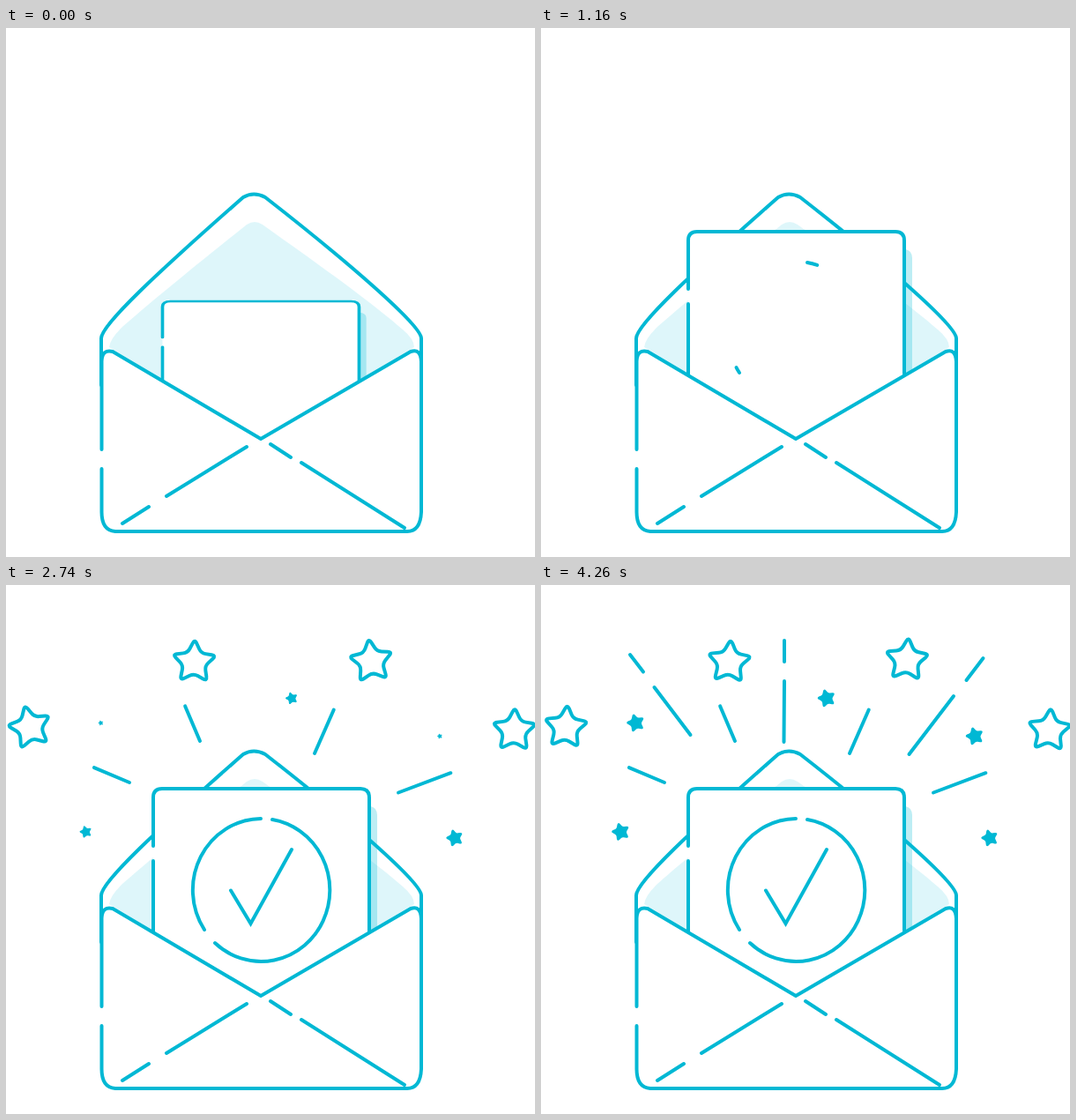
Animation of 600x600 px, one loop 4820 ms. Source, as an HTML page:

```html
<!DOCTYPE html>
<html lang="en">
<head>
<meta charset="utf-8">
<title>Opening envelope</title>
<style>
  html, body { margin: 0; width: 100%; height: 100%; overflow: hidden; background: #fff; }
  svg { display: block; width: 100%; height: 100%; }
  .line { fill: none; stroke: #00b8d4; stroke-width: 4; stroke-linecap: round; stroke-linejoin: round; }
  .white { fill: #fff; }
  .tint { fill: #00b8d4; }
</style>
</head>
<body>
<svg viewBox="0 0 600 600">
  <path class="tint" opacity=".13" d="M117 362Q118 353 130 341C145 327 200 281 273 223Q282 217 291 223C340 258 410 307 450 342Q463 353 463 362L289 466Z"/>
  <path class="line" stroke-width="4.5" d="M108 405V352C108 337 170 279 269 192Q281 185 294 192C385 263 471 337 471 352V378"/>
  <g id="card">
    <path class="tint" opacity=".26" d="M412 251Q421 252 421 261V440H412Z"/>
    <path class="white" d="M167 480V241Q167 231 177 231H402Q412 231 412 241V480Z"/>
    <path class="line" d="M167 296V241Q167 231 177 231H402Q412 231 412 241V392M167 313V420"/>
  </g>
  <g id="seal"></g>
  <path class="white" d="M108.5 378Q109 366 119 366L289 466L461 366Q471 366 471 378V549Q471 571 455 571H124Q108.5 571 108.5 549Z"/>
  <path class="line" d="M108.5 478V378Q109 364 121 367L289 466L459 367Q470 363 471 378V549Q470 571 455 571H124Q108.5 570 108.5 549V500M273 475L182 531M162 543L132 562M300 472L323 487M335 493L452 567"/>
  <g id="sky"></g>
</svg>
<script>
const LOOP = 4820, STEP = 20, START = 1680, END = 4260, SWAY = 1720;
const card = document.getElementById('card');
const seal = document.getElementById('seal');
const sky = document.getElementById('sky');

const clamp = (v, lo, hi) => Math.min(hi, Math.max(lo, v));
const progress = (t, from, to) => clamp((t - from) / (to - from), 0, 1);
const mix = (a, b, p) => a + (b - a) * p;

function addPath(parent, d, cls = 'line') {
  const path = document.createElementNS('http://www.w3.org/2000/svg', 'path');
  path.setAttribute('d', d);
  path.setAttribute('class', cls);
  parent.append(path);
  return path;
}

function stroke(parent, d) {
  const path = addPath(parent, d);
  path.setAttribute('pathLength', 100);
  return path;
}

// Reveal a fraction of a path from its beginning
function draw(path, p) {
  path.style.display = p > 0 ? '' : 'none';
  path.setAttribute('stroke-dasharray', p >= 1 ? 'none' : `${p * 100} 200`);
}

// Five-pointed star with rounded corners
function starPath() {
  const pts = Array.from({ length: 10 }, (_, i) => {
    const r = i % 2 ? 13 : 26, a = i * Math.PI / 5;
    return [r * Math.sin(a), -r * Math.cos(a)];
  });
  const along = (a, b) => a.map((v, i) => mix(v, b[i], 0.3).toFixed(2));
  return pts.map((p, i) => {
    const before = along(p, pts[(i + 9) % 10]), after = along(p, pts[(i + 1) % 10]);
    return `${i ? 'L' : 'M'}${before}Q${p} ${after}`;
  }).join('') + 'Z';
}

const arcs = ['M302 266A78 81 0 1 1 237 406', 'M225 391A78 81 0 0 1 289 265'].map(d => stroke(seal, d));
const check = stroke(seal, 'M255 346.5L277.5 384L324 300');
check.style.strokeLinejoin = 'miter';

const shortRays = ['M220 177L203 137', 'M140 224L99.5 207', 'M350 191L372 141', 'M445 235.5L505 213']
  .map(d => stroke(sky, d));
const longRays = [
  'M169.5 170L128.5 116', 'M116 98.5L101 79',
  'M275.5 178L276 109', 'M276 87L276 63',
  'M417.5 192L468 126', 'M482.5 108L501.5 83'
].map(d => stroke(sky, d));

const shape = starPath();
// x, y, sine part of the sway, vertical drift per degree
const bigStars = [[212.5, 87.5, 3, 0], [414, 87.5, -9, 0.14], [575.5, 165, 3, 0], [27.2, 161.5, -19, 0]]
  .map(s => [addPath(sky, shape), ...s]);
// x, y, pulse period, delay
const smallStars = [[107.5, 156.5, 430, 0], [324, 128.5, 860, 0], [492, 171.5, 430, 0], [90.5, 280, 860, 0], [509, 287, 1290, -115]]
  .map(s => [addPath(sky, shape, 'line'), ...s]);
smallStars.forEach(([path]) => { path.style.fill = '#00b8d4'; });

function place(path, x, y, angle, scale) {
  path.style.display = scale > 0 ? '' : 'none';
  path.setAttribute('transform', `translate(${x} ${y}) rotate(${angle}) scale(${scale})`);
}

function render(t) {
  const grow = progress(t, 0, 660);
  const top = t < 640 ? mix(310, 208.5, t / 640) : mix(208.5, 231, progress(t, 640, 780));
  card.setAttribute('transform',
    `translate(${mix(177.5, 167, grow)} ${top}) scale(${mix(0.91, 1, grow)} ${mix(0.63, 1, grow)}) translate(-167 -231)`);

  arcs.forEach(a => draw(a, progress(t, 1140, 1640)));
  draw(check, progress(t, 1380, 1880));

  const pop = progress(t, 1160, 1660);
  const u = clamp(t, START, END) - START;
  const phase = u / SWAY * 2 * Math.PI;
  const reach = 0.7 - 0.31 * Math.cos(phase - 0.365);
  shortRays.forEach(r => draw(r, pop * reach));
  longRays.forEach(r => draw(r, progress(t, 2760, 3260)));

  for (const [path, x, y, sine, drift] of bigStars) {
    const turn = -17 * Math.cos(phase) - sine * Math.sin(phase);
    place(path, x + turn / 17, y - turn * drift, turn - 13, pop);
  }
  for (const [path, x, y, period, delay] of smallStars) {
    const size = 0.64 + 0.36 * Math.cos((u - delay) / period * 2 * Math.PI);
    place(path, x, y, -16, 0.4 * pop * size);
  }
}

const begin = performance.now();
function tick() {
  const t = (performance.now() - begin) % LOOP;
  render(Math.floor(t / STEP) * STEP);
  requestAnimationFrame(tick);
}
tick();
</script>
</body>
</html>
```
